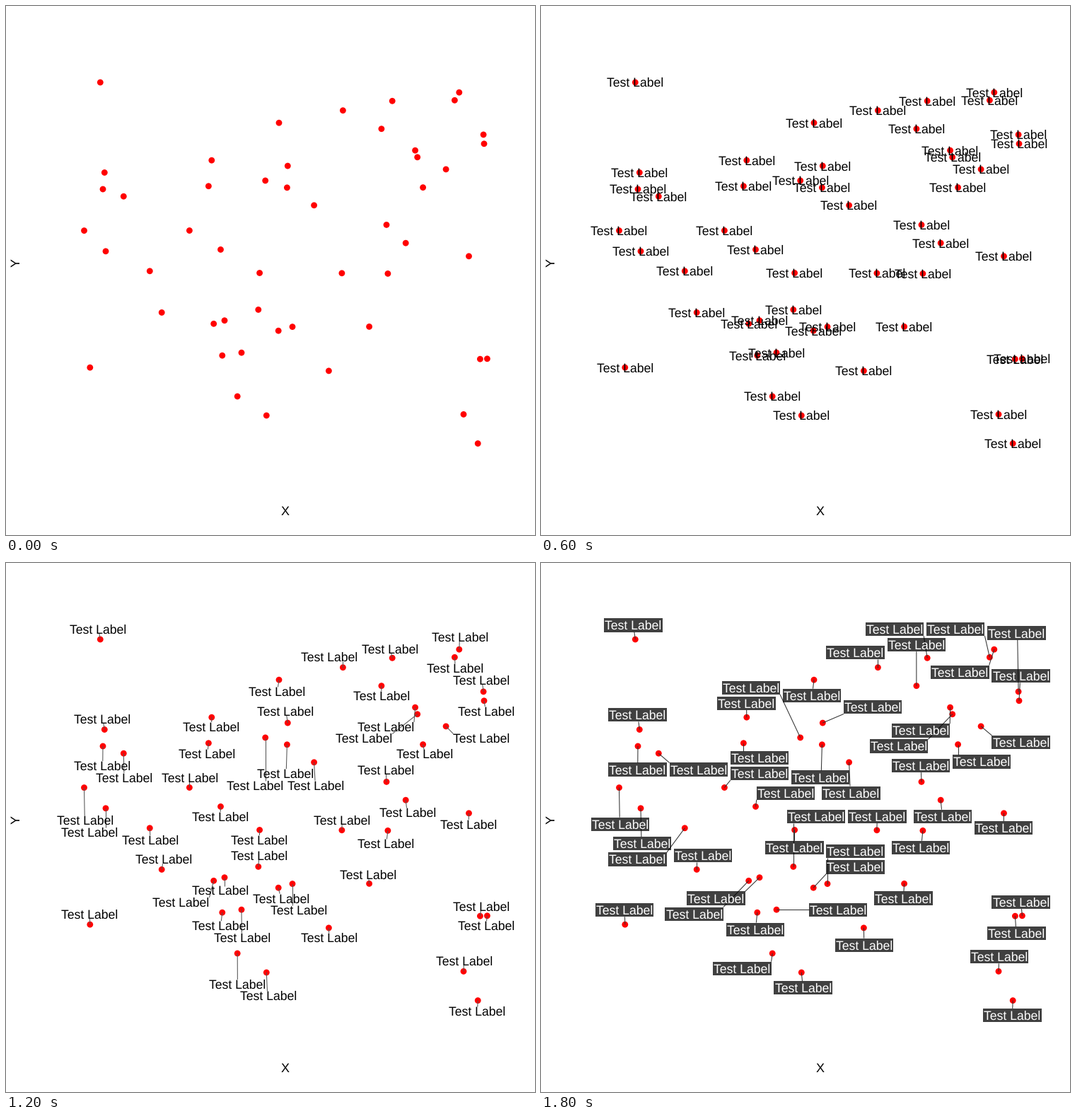
A matplotlib script that plays this animation: 748x748 px, repeating every 2.4 s.

```python
import numpy as np
import matplotlib.pyplot as plt
from matplotlib.animation import FuncAnimation
from matplotlib.patches import Circle, Rectangle

SIZE = 748
DPI = 100
PT = 72 / DPI  # points per pixel
LABEL = "Test Label"
LABEL_PX = 17.6
AXIS_PX = 18
CAP = 0.716  # cap height in em

plt.rcParams["font.family"] = "Liberation Sans"
plt.rcParams["text.hinting"] = "none"

# Scattered data in the order in which the labels are placed.
points = np.array([
    (133.3, 108), (139.3, 235.5), (137, 259), (166.3, 269.2), (110.5, 317.6),
    (141, 346.8), (220.2, 433.4), (203.3, 374.8), (118.8, 511.2), (290.8, 218.2),
    (397.4, 256.8), (286.4, 254.7), (259.4, 317.5), (303.5, 344.4), (386, 165.2),
    (398.3, 226.1), (435.6, 281.8), (366.7, 246.9), (358.6, 377.5), (309, 444.7),
    (356.8, 429.4), (305.8, 494.2), (333, 490.2), (293.7, 449.3), (385.2, 459.2),
    (327.2, 552), (368.3, 579), (456.4, 515.9), (513.6, 453.4), (405, 453.6),
    (474.9, 377.8), (539.9, 378.4), (538, 309.4), (565.2, 335.2), (589.6, 256.6),
    (654.5, 353.8), (676, 194.8), (622.1, 230.9), (675.1, 181.9), (640.8, 122.2),
    (530.9, 173.7), (634.4, 133.3), (546.2, 134.3), (476.4, 147.7), (578.6, 204.2),
    (581.7, 213.8), (680.4, 498.8), (670.4, 499.2), (647, 577.4), (667.2, 618.6)])

fig = plt.figure(figsize=(SIZE / DPI, SIZE / DPI), dpi=DPI, facecolor="white")
ax = fig.add_axes([0, 0, 1, 1])
ax.set_xlim(0, SIZE)
ax.set_ylim(SIZE, 0)
ax.axis("off")


def write(x, y, text, px, color="black"):
    """Text centred on its cap height."""
    ax_text = ax.text(x, y + px * CAP / 2, text, fontsize=px * PT, color=color,
                      ha="center", va="baseline", zorder=6)
    return ax_text


def place_labels(width, height):
    """Give each point the nearest grid spot clear of dots and earlier labels."""
    gx, gy = np.meshgrid(np.linspace(87.3, 703.3, 101),
                         np.linspace(87.57, 639.07, 101))

    def clear_of(x, y):
        return (abs(gx - x) >= width) | (abs(gy - y) >= height)

    free = np.all([clear_of(*p) for p in points], axis=0)
    spots = []
    for x, y in points:
        distance = np.where(free, np.hypot(gx - x, gy - y), np.inf)
        best = np.unravel_index(distance.argmin(), distance.shape)
        spot = gx[best], gy[best]
        free &= clear_of(*spot)
        spots.append(spot)
    return np.array(spots) + (0, 0.43)


def connector(point, center, half, color):
    """Line from a point to the nearest spot on its label box."""
    end = np.clip(point, center - half, center + half)
    lean = center[0] - point[0]
    if abs(lean) < 4:
        end[0] += lean * 0.5
    return ax.plot(*zip(point, end), color=color, lw=1.05 * PT,
                   solid_capstyle="butt", zorder=3)[0]


def plain_labels():
    return [write(x, y, LABEL, LABEL_PX) for x, y in points]


def repelled_labels():
    art = []
    half = np.array([40, 6.4])
    for p, c in zip(points, place_labels(80.2, 12.75)):
        art += [connector(p, c, half, "#555555"),
                write(*c, LABEL, LABEL_PX)]
    return art


def boxed_labels():
    art = []
    half = np.array([41.2, 9.6])
    for p, c in zip(points, place_labels(83, 19.1)):
        box = Rectangle(c - half, *(2 * half), fc=(0, 0, 0, 0.75), ec="none",
                        zorder=5)
        art += [connector(p, c, half, "#333333"),
                ax.add_patch(box),
                write(*c, LABEL, LABEL_PX, "white")]
    return art


for p in points:
    ax.add_patch(Circle(p, 4.4, fc="red", ec="none", zorder=2))
write(395, 714, "X", AXIS_PX)
y_title = write(0, 0, "Y", AXIS_PX)
y_title.set(position=(13 + AXIS_PX * CAP / 2, 363), rotation=90,
            rotation_mode="anchor")

stages = [[], plain_labels(), repelled_labels(), boxed_labels()]


def show(frame):
    for i, stage in enumerate(stages):
        for artist in stage:
            artist.set_visible(i == frame)
    return []


show(0)
anim = FuncAnimation(fig, show, frames=len(stages), interval=600,
                     repeat=True, repeat_delay=0, blit=False)
plt.show()
```
